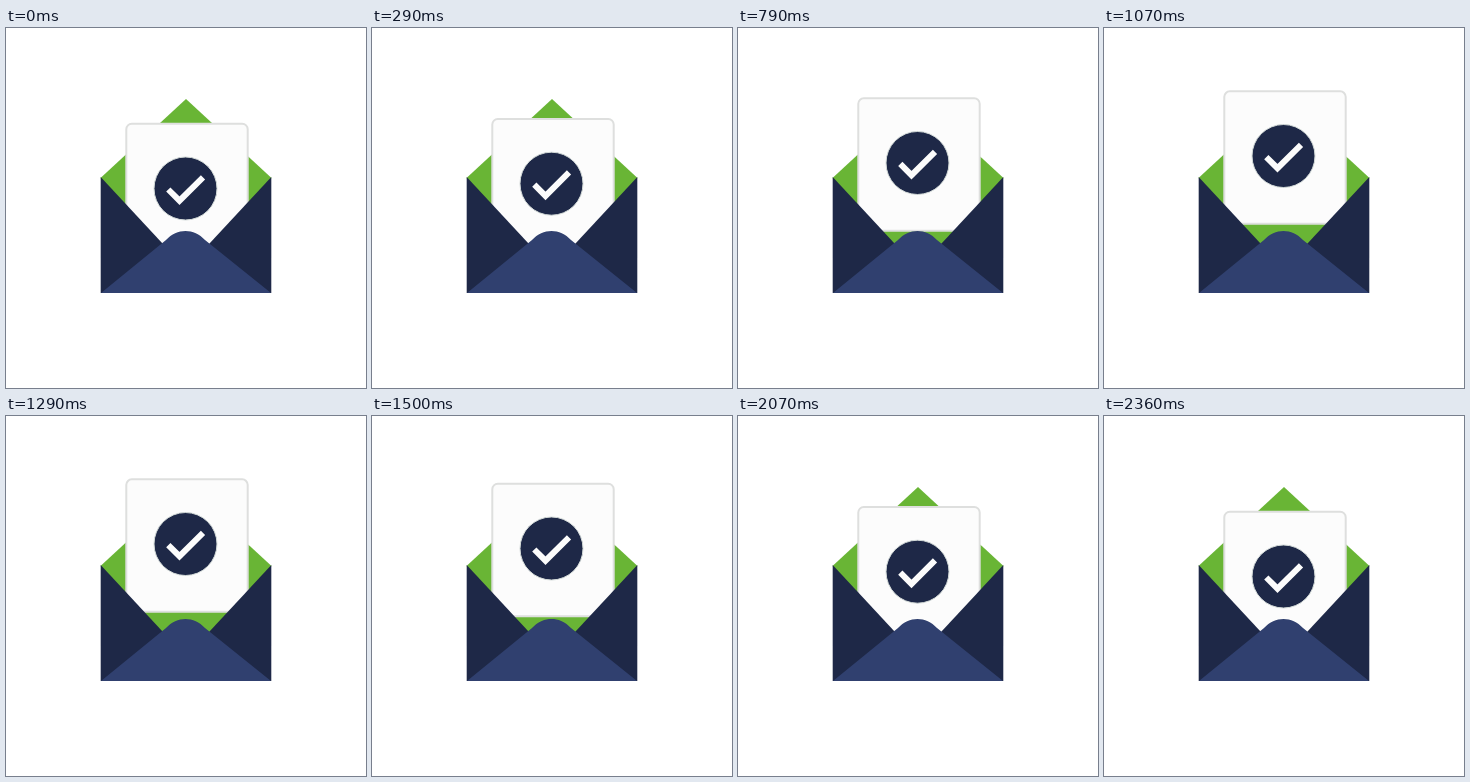
Recreate the animation shown at these times as an HTML page without scripts. Size 360x360 px, loop 2.43 s.

```html
<!DOCTYPE html>
<html lang="en">
<head>
<meta charset="utf-8">
<title>Letter in envelope</title>
<style>
  @property --k {
    syntax: "<number>";
    inherits: false;
    initial-value: 0;
  }
  html, body {
    margin: 0;
    width: 100%;
    height: 100%;
    overflow: hidden;
    background: #fff;
  }
  svg {
    display: block;
    width: 100vw;
    height: 100vh;
  }
  /* 16 steps up, one held, 16 steps down, one held */
  .letter {
    --phase: calc(min(var(--k), 16) - max(var(--k) - 17, 0));
    transform: translateY(calc(-16.4px * (1 - cos(var(--phase) * 11.25deg))));
    animation: tick 2430ms steps(34) -5ms infinite;
  }
  @keyframes tick {
    from { --k: 0; }
    to { --k: 34; }
  }
  .back { fill: #69b535; }
  .paper { fill: #fcfcfc; stroke: #dedfde; stroke-width: 2; }
  .badge { fill: #1e2847; stroke: #d3dad8; stroke-width: 1; }
  .tick { fill: none; stroke: #fcfcfc; stroke-width: 6; }
  .side { fill: #1e2847; }
  .front { fill: #30406f; }
</style>
</head>
<body>
<svg viewBox="0 0 360 360">
  <path class="back" d="M180 71L265.5 150L180 250L94.5 150Z"/>
  <g class="letter">
    <rect class="paper" x="120.3" y="95.8" width="121.4" height="132.4" rx="5.5"/>
    <circle class="badge" cx="179.5" cy="160.5" r="31.5"/>
    <path class="tick" d="M162.3 161.5L173.5 172.7L197 149.3"/>
  </g>
  <path class="side" d="M94.7 149L170 230V265H94.7Z"/>
  <path class="side" d="M265.3 149L190 230V265H265.3Z"/>
  <path class="front" d="M95 265L160 212C171 200 188 200 199 212L265 265Z"/>
</svg>
</body>
</html>
```
